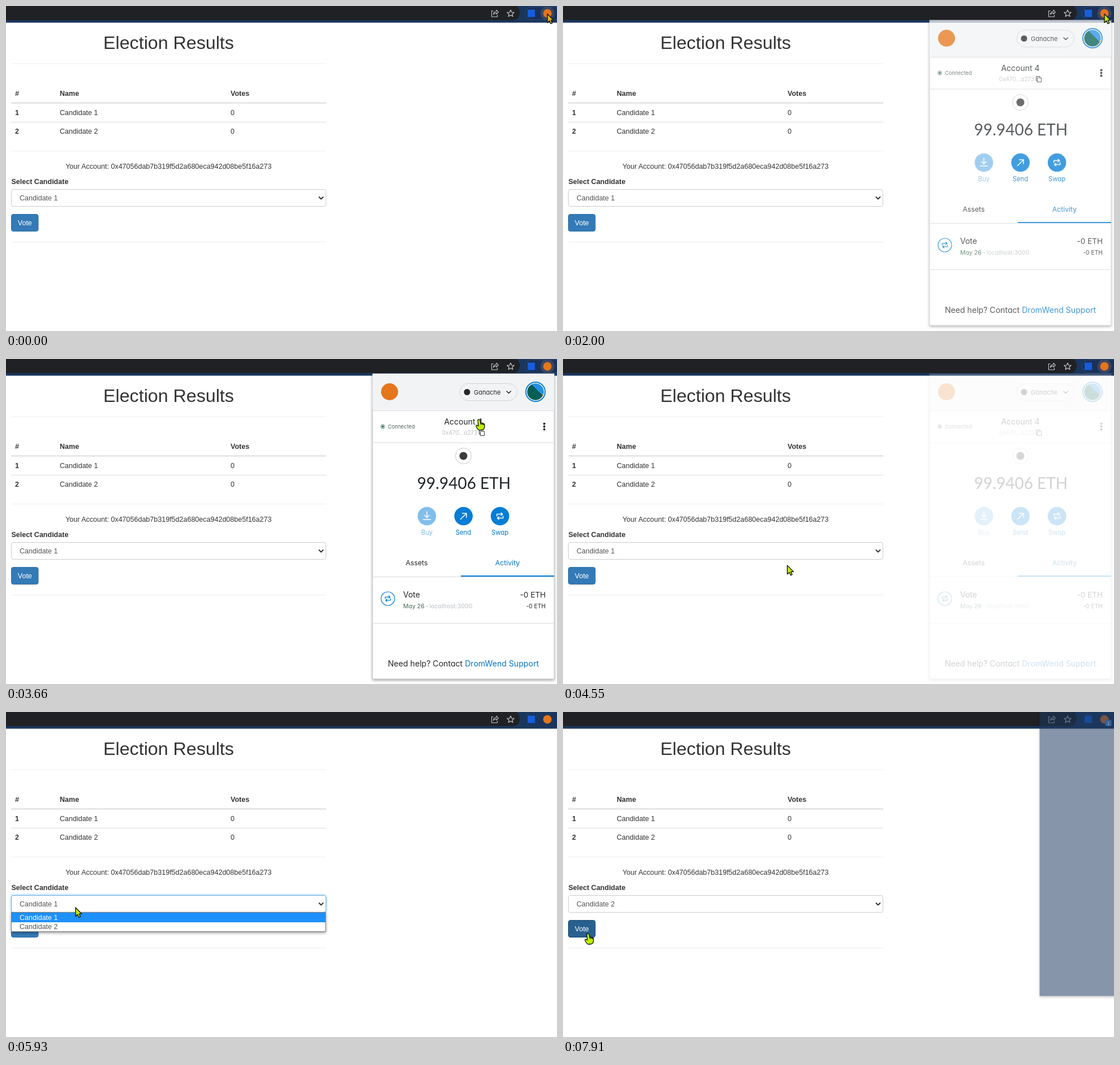
Write an HTML page that moves like this. It is 974 px wide and 575 px high and loops after 7990 ms.

```html
<!DOCTYPE html>
<html lang="en">
<head>
<meta charset="utf-8">
<title>Election Results</title>
<style>
  html, body { margin: 0; width: 100%; height: 100%; overflow: hidden; background: #fff; }
  svg { display: block; }
  text { font: 12.53px "Liberation Sans", Arial, sans-serif; fill: #333; white-space: pre; }
  .b { font-weight: 700; }
  .mid { text-anchor: middle; }
  .end { text-anchor: end; }
  .hr { stroke: #eee; }
  .row { stroke: #ddd; }
  #wallet text { font-family: Inter, "Open Sans", sans-serif; font-feature-settings: "cv11"; fill: #24272a; }
  #wallet .blue { fill: #0376c9; }
  #wallet .pale { fill: #bbc0c5; }
  .line { fill: none; stroke-width: 1.5; stroke-linecap: round; stroke-linejoin: round; }
  .rule { stroke: #d6d9dc; }
</style>
</head>
<body>
<svg width="974" height="575" viewBox="0 0 974 575">
  <defs>
    <filter id="soft" x="-20%" y="-20%" width="140%" height="140%"><feDropShadow dx="0" dy="2" stdDeviation="2.5" flood-opacity=".38"/></filter>
    <filter id="glow" x="-5%" y="-50%" width="110%" height="200%"><feDropShadow dx="0" dy="0" stdDeviation="2.2" flood-color="#66afe9" flood-opacity=".8"/></filter>
    <clipPath id="face"><circle cx="936" cy="58" r="14.5"/></clipPath>
    <path id="swap" class="line" d="M-5.5 0V-3.5H4M1.8-6L4.6-3.5L1.8-1M5.5 0V3.5H-4M-1.8 6L-4.6 3.5L-1.8 1"/>
  </defs>
  <rect width="974" height="575" fill="#fff"/>

  <g id="toolbar">
    <rect width="974" height="29.5" fill="#1b365d"/>
    <path d="M0 0H903Q909 6 908 13Q907 25 895 25H0Z" fill="#202124"/>
    <g id="active">
      <path d="M974 1.5H929A11.5 11.5 0 0 0 929 24.5H974" fill="#1a3158" stroke="#2b4870"/>
      <circle cx="957" cy="13" r="12.5" fill="#3a4663"/>
    </g>
    <g class="line" stroke="#c5c9ce" stroke-width="1.2">
      <path d="M861 8.5H858.5V19H868.5V16M861.5 15Q862 9.5 867 9.5V7L870.5 10.8L867 14.3V12Q863.5 12 861.5 15Z" style="stroke-width:1.1"/>
      <path d="M892 7L893.8 11L898.2 11.4L894.9 14.3L895.9 18.5L892 16.2L888.1 18.5L889.1 14.3L885.8 11.4L890.2 11Z" style="stroke-width:1.2"/>
    </g>
    <rect x="922" y="6.5" width="13" height="13" fill="#175ddc"/>
    <circle id="walletIcon" cx="957" cy="13" r="7.5" fill="#e4761b"/>
    <g id="badge">
      <rect x="958.500" y="14" width="11" height="11" rx="2" fill="#4a90d9"/>
      <text class="b mid" x="964" y="22.500" style="font-size:8.500px;fill:#fff">1</text>
    </g>
  </g>

  <g id="page">
    <text class="mid" x="287.500" y="76" style="font-size:32.2px">Election Results</text>
    <path class="hr" d="M9 102H566M9 256.500H566M9 417.500H566"/>
    <text class="b" x="16" y="159">#</text>
    <text class="b" x="95" y="159">Name</text>
    <text class="b" x="397" y="159">Votes</text>
    <path class="row" d="M9 171.500H566" stroke-width="1.800"/>
    <text class="b" x="16" y="193">1</text>
    <text x="95" y="193">Candidate 1</text>
    <text x="397" y="193">0</text>
    <path class="row" d="M9 205.500H566"/>
    <text class="b" x="16" y="226">2</text>
    <text x="95" y="226">Candidate 2</text>
    <text x="397" y="226">0</text>
    <text class="mid" x="287.300" y="288">Your Account: 0x47056dab7b319f5d2a680eca942d08be5f16a273</text>
    <text class="b" x="9.500" y="315">Select Candidate</text>
    <rect id="select" x="9.500" y="324.500" width="556" height="30" rx="3.500" fill="#fff"/>
    <text id="choice" x="24" y="344" style="fill:#555"></text>
    <path class="line" d="M553.500 338L557 341.500L560.500 338" stroke="#333" style="stroke-width:1.900"/>
    <rect id="button" x="9.500" y="368.500" width="47.500" height="30" rx="3.500"/>
    <text class="mid" x="33.300" y="388" style="fill:#fff">Vote</text>
  </g>

  <g id="menu">
    <rect x="9.500" y="354.500" width="555.500" height="34" fill="#fff" stroke="#777" filter="url(#soft)"/>
    <rect id="mark" x="10" width="555" height="17" fill="#1e90ff"/>
    <text id="first" x="24" y="367.500">Candidate 1</text>
    <text id="second" x="24" y="384">Candidate 2</text>
  </g>

  <g id="wallet">
    <rect x="648" y="26" width="321" height="540" fill="#fff" stroke="#b5b8bc" stroke-width=".8" filter="url(#soft)"/>
    <rect x="648" y="26" width="321" height="65" fill="#f2f3f5"/>
    <circle cx="678" cy="58" r="15" fill="#e4761b"/>
    <rect x="802" y="43.500" width="101.500" height="30" rx="15" fill="none" stroke="#d0d3d6"/>
    <circle cx="815" cy="58.500" r="5.500" fill="#24272a"/>
    <text x="827" y="62.500" style="font-size:11px">Ganache</text>
    <path class="line" d="M885 57L888.700 60.500L892.400 57" stroke="#24272a"/>
    <circle cx="936" cy="58" r="17" fill="#fff" stroke="#1180d0" stroke-width="2"/>
    <g clip-path="url(#face)">
      <rect x="920" y="42" width="32" height="32" fill="#035e56"/>
      <path d="M926 42H954V74L949 65Z" fill="#2491e6"/>
      <path d="M952 58L938 75H952Z" fill="#f5802a"/>
      <path d="M926 42L949 65L940 75H920V42Z" fill="#035e56"/>
    </g>
    <path class="rule" d="M648 91.500H969M648 148H969"/>
    <circle cx="666" cy="119.500" r="3.500" fill="#fff" stroke="#5c7f70"/>
    <circle cx="666" cy="119.500" r="2" fill="#1c6b43"/>
    <text x="675" y="122.500" style="font-size:9.200px;fill:#4b6459">Connected</text>
    <text class="mid" x="808.500" y="115.500" style="font-size:14px">Account 4</text>
    <text class="pale mid" x="802" y="134" style="font-size:10px">0x470...a273</text>
    <path class="line" d="M838.500 133H836.500V125.500H843V127M839 128H845.500V135.500H839Z" stroke="#333" style="stroke-width:1"/>
    <g fill="#24272a"><circle cx="951.500" cy="114.500" r="2"/><circle cx="951.500" cy="119.500" r="2"/><circle cx="951.500" cy="124.500" r="2"/></g>
    <circle cx="808.500" cy="171.500" r="14" fill="#fff" stroke="#c5c8cb"/>
    <circle cx="808.500" cy="171.500" r="7" fill="#3c3c3d"/>
    <text class="mid" x="809.500" y="230" style="font-family:Lato,sans-serif;font-size:28px">99.9406 ETH</text>
    <g fill="#037dd6">
      <circle cx="744" cy="278" r="16.300" fill="#81beea"/><circle cx="808.700" cy="278" r="16.300"/><circle cx="873.200" cy="278" r="16.300"/>
    </g>
    <g class="line" stroke="#fff">
      <path d="M744 270V280M740 276.500L744 280.500L748 276.500M737.500 284H750.500"/>
      <path d="M803.500 283.500L814 273M806.500 273H814V280.500"/>
      <use href="#swap" x="873.200" y="278"/>
    </g>
    <g class="mid" style="font-size:11.200px">
      <text class="blue" x="744" y="311" opacity=".5" style="font-size:11.300px">Buy</text>
      <text class="blue" x="808.500" y="311" style="font-size:11.300px">Send</text>
      <text class="blue" x="873" y="311" style="font-size:11.300px">Swap</text>
    </g>
    <text class="mid" x="726" y="365" style="font-size:12.300px">Assets</text>
    <text class="mid blue" x="886.500" y="365" style="font-size:12.300px">Activity</text>
    <path class="rule" d="M648 385.500H969M648 467.500H969"/>
    <path d="M804 384H969" stroke="#037dd6" stroke-width="2"/>
    <circle cx="675" cy="424" r="12" fill="none" stroke="#037dd6" stroke-width="1.200"/>
    <use href="#swap" transform="translate(675 424) scale(.85)" stroke="#037dd6"/>
    <text x="702" y="422" style="font-size:14px">Vote</text>
    <text class="end" x="954" y="422" style="font-size:13.500px">-0 ETH</text>
    <text x="702" y="441" style="font-size:10.500px;fill:#3e6c55">May 26 ·</text>
    <text class="pale" x="748.500" y="441" style="font-size:10.700px">localhost:3000</text>
    <text class="end" x="954" y="441" style="font-size:10.300px">-0 ETH</text>
    <text class="mid" x="808.500" y="543.500" style="font-size:14.100px">Need help? Contact <tspan class="blue">DromWend Support</tspan></text>
  </g>

  <rect id="window" x="843" y="-5" width="140" height="507" fill="#1e3960" stroke="#1e3960" filter="url(#soft)"/>

  <g id="cursor" stroke="#111" stroke-width="1.300" stroke-linejoin="round">
    <path id="arrow" d="M0 0V15.500L3.500 12.300L6 17.500L8.700 16.200L6.300 11.200H11Z"/>
    <path id="hand" fill="#bdf000" d="M-2 1.500Q-1.500-.5 .5 0Q2 .5 2.300 2L3 6L7.500 7Q10 7.500 10 10.500L9.500 15Q9 18 5.500 18.500L1.500 19Q-1 19-2.500 16.500L-5 12.500Q-5.500 10-3.500 10.200L-1 11.500ZM3 6V9M5.500 6.800V9.500M7.800 7.300V10"/>
  </g>
</svg>
<script>
const LOOP = 7990, STEP = 70;
const $ = id => document.getElementById(id);
const show = (id, on) => $(id).setAttribute('display', on ? 'inline' : 'none');
const set = (id, attrs) => { for (const k in attrs) $(id).setAttribute(k, attrs[k]); };
const mix = (a, b, p) => a + (b - a) * p;
const ease = p => p * p * (3 - 2 * p);

// Pointer moves: start time, number of steps, destination.
const moves = [
  [2600, 12, 838, 112], [3450, 4, 836, 107], [3730, 3, 894, 222],
  [4130, 4, 404, 338], [4470, 7, 366, 475], [4960, 5, 94, 392],
  [5310, 5, 123, 346], [6140, 5, 122, 379], [7080, 6, 44, 392]
];

function pointer(t) {
  let x = 957, y = 14;
  for (const [start, steps, toX, toY] of moves) {
    if (t < start) break;
    const p = ease(Math.min(1, (Math.floor((t - start) / STEP) + 1) / steps));
    x = mix(x, toX, p);
    y = mix(y, toY, p);
  }
  return [x, y];
}

// Value of the last entry whose time has passed.
const held = (t, entries) => entries.reduce((v, [at, next]) => t >= at ? next : v, 0);

function draw(t) {
  const [x, y] = pointer(t);
  const hand = (t >= 3240 && t < 3800) || t >= 7290;
  set('cursor', { transform: `translate(${x} ${y})` });
  show('hand', hand);
  show('arrow', !hand);
  const warm = 1 - Math.min(1, Math.max(0, Math.floor((t - 580) / STEP) / 5));
  set('arrow', { fill: `rgb(${mix(190, 218, warm)},${mix(232, 178, warm)},${mix(8, 35, warm)})` });

  const alpha = held(t, [[1860, .2], [1930, .5], [2000, .75], [2070, 1], [4470, .6], [4540, .2], [4610, 0]]);
  const lift = t < 2070 ? held(t, [[1860, -3], [1930, -2], [2000, -1]]) : 0;
  set('wallet', { opacity: alpha, transform: `translate(0 ${lift})` });
  show('wallet', alpha > 0);

  const open = t >= 5720 && t < 6550;
  const focus = t >= 5720 && t < 7630;
  const second = y > 372;
  show('active', t < 5720);
  show('menu', open);
  set('mark', { y: second ? 371.5 : 355 });
  $('first').style.fill = second ? '#555' : '#fff';
  $('second').style.fill = second ? '#fff' : '#555';
  $('choice').textContent = t < 6550 ? 'Candidate 1' : 'Candidate 2';
  set('select', { stroke: focus ? '#66afe9' : '#ccc', filter: focus ? 'url(#glow)' : 'none' });

  const hover = t >= 7290;
  set('button', { fill: hover ? '#286090' : '#337ab7', stroke: hover ? '#204d74' : '#2e6da4' });

  show('badge', t >= 7770);
  const veil = held(t, [[7840, .25], [7910, .53]]);
  set('window', { opacity: veil });
  show('window', veil > 0);
}

const begin = performance.now();
function tick() {
  draw((performance.now() - begin) % LOOP);
  requestAnimationFrame(tick);
}
draw(0);
requestAnimationFrame(tick);
</script>
</body>
</html>
```
